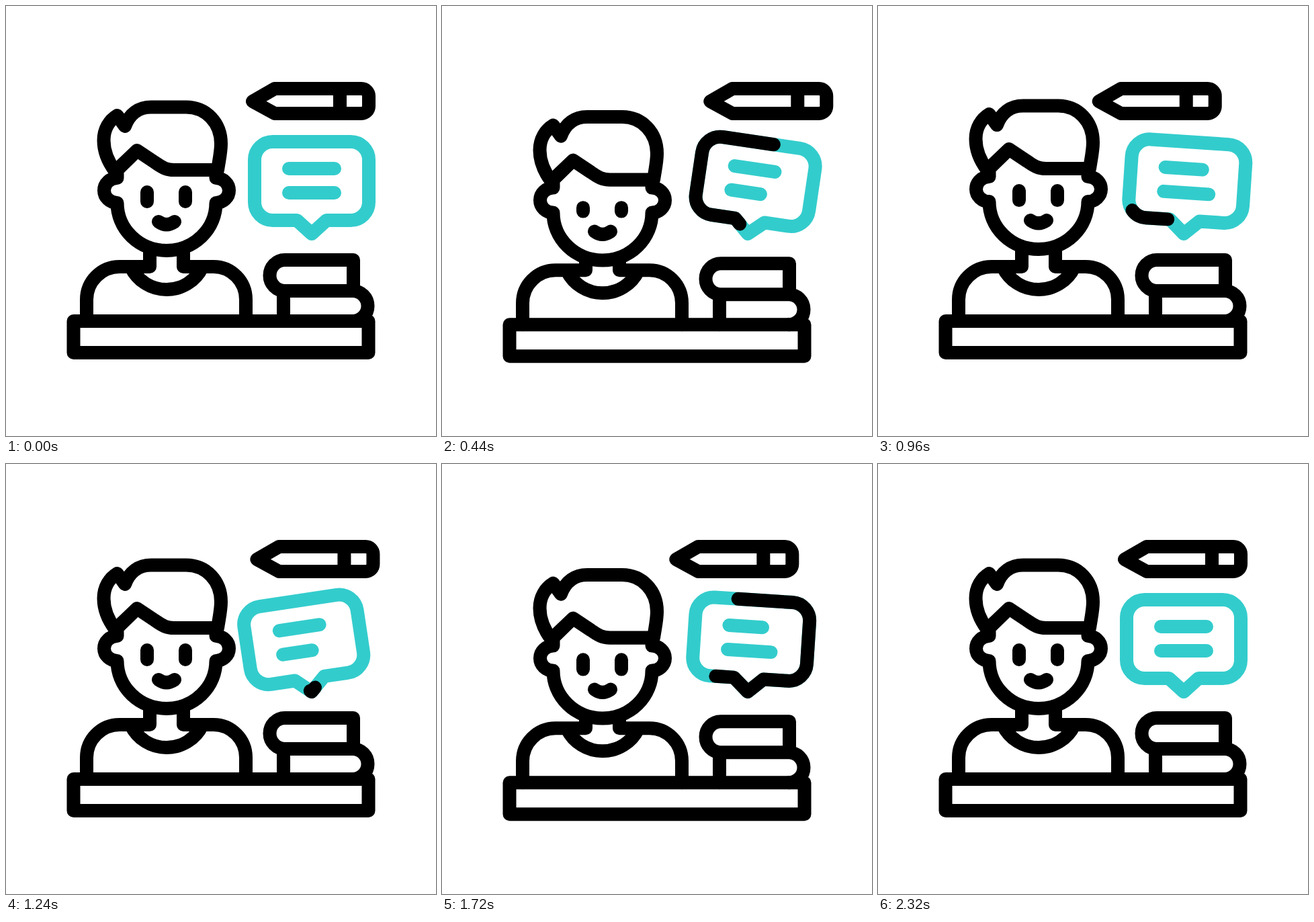
Animation, 640 px wide and 640 px high, one loop 2.64 s. Source, as an HTML page:

```html
<!DOCTYPE html>
<html>
<head>
<meta charset="utf-8">
<style>
html, body { margin: 0; height: 100%; overflow: hidden; background: #fff; }
svg { display: block; width: 100%; height: 100%; }
path { stroke-width: 20; stroke-linecap: round; stroke-linejoin: round; }
</style>
</head>
<body>
<svg viewBox="0 0 640 640" fill="none" stroke="#000">
  <g id="body">
    <path d="M120 469V437A49 49 0 0 1 169 388H214V362M264 362V388H309A48 49 0 0 1 357 437V469"/>
    <path d="M186 389A59 59 0 0 0 292 389"/>
    <path d="M517 424V378H415A22.5 23 0 0 0 415 424H516A22.5 22.5 0 0 1 516 469M413 424V469"/>
    <path d="M100.500 469H539.500V516H100.500Z"/>
    <g id="head">
      <path fill="#fff" d="M165.500 256A19.500 18.500 0 0 0 165.500 293A73.500 71 0 0 0 312.500 293A19.500 18.500 0 0 0 312.500 256V244H250L195 215L165.500 244Z"/>
      <path fill="#fff" d="M162.500 246C149 228 145.500 212 145.500 200C145.500 183 154 170 165.500 163L177 179C184 160 198 150.500 216 150.500H268C298 150.500 320 174 320 205C320 218 317 230 315 244H250C236 244 230 238 222 233L195 215Z"/>
      <path id="eyes"/>
      <path d="M227 321Q239 329.500 251 321"/>
    </g>
  </g>
  <path id="pencil" d="M367 142L400 123H529A11 11 0 0 1 540 134V149A11 11 0 0 1 529 160H400ZM497 123V160"/>
  <g id="bubble" stroke="#3cc">
    <path id="outline" pathLength="1000" d="M433 319H397A27 27 0 0 1 370 292V229A27 27 0 0 1 397 202H513A27 27 0 0 1 540 229V292A27 27 0 0 1 513 319H477L455 339Z"/>
    <path id="trace" pathLength="1000" stroke="#000"/>
    <path id="lines"/>
  </g>
</svg>
<script>
const $ = id => document.getElementById(id);
const set = (id, name, value) => $(id).setAttribute(name, value);
set('trace', 'd', $('outline').getAttribute('d'));

// Smooth 0 to 1 between two times
function step(t, from, to) {
  const u = Math.min(1, Math.max(0, (t - from) / (to - from)));
  return u * u * (3 - 2 * u);
}

// Up to 1 at the peak time and back to 0
const pulse = (t, from, peak, to) => step(t, from, peak) - step(t, peak, to);

// One way, then the other, then back to rest
const swing = (t, from, high, low, to, up, down = up) =>
  up * pulse(t, from, high, low) - down * pulse(t, high, low, to);

const lineLength = t =>
  t < 0 || t > 1600 ? 68 : 68 * (0.73 + 0.27 * Math.cos(t * Math.PI / 400));

function draw(t) {
  const hop = t % 1280;
  set('body', 'transform', `translate(0 ${swing(hop, 0, 240, 640, 960, 26, 15.5)})`);
  set('head', 'transform', `translate(0 ${swing(hop, 120, 380, 740, 1040, 11)})`);

  const squint = swing(t, 240, 400, 640, 880, 10) - 3.5 * pulse(t, 1680, 1920, 2160);
  set('eyes', 'd', `M210 ${277 + squint}V291M267 ${277 + squint}V291`);

  const slide = swing(t, 200, 530, 920, 1400, 39.5) + swing(t, 920, 1400, 1790, 2200, 22.5);
  set('pencil', 'transform', `translate(${slide} 0)`);

  const tilt = swing(t, 0, 760, 1200, 1580, 13.6, 9)
    + 6.3 * pulse(t, 1200, 1580, 1900) + 4 * pulse(t, 1900, 2180, 2320);
  set('bubble', 'transform', `rotate(${tilt} 455 340)`);
  set('lines', 'd', `M421 242h${lineLength(t - 320)}M421 278h${lineLength(t - 200)}`);

  const run = t < 1120 ? t : t - 1000;
  const start = 1000 * step(run, 480, 1080);
  const length = 1000 * step(run, 200, 680) - start;
  set('trace', 'visibility', length > 0 ? 'visible' : 'hidden');
  set('trace', 'stroke-dasharray', `${length} ${1000 - length}`);
  set('trace', 'stroke-dashoffset', 130 - run / 4 - start);
}

function tick() {
  const t = performance.now() % 2640;
  draw(Math.min(2320, Math.floor(t / 40) * 40));
  requestAnimationFrame(tick);
}
tick();
</script>
</body>
</html>
```
